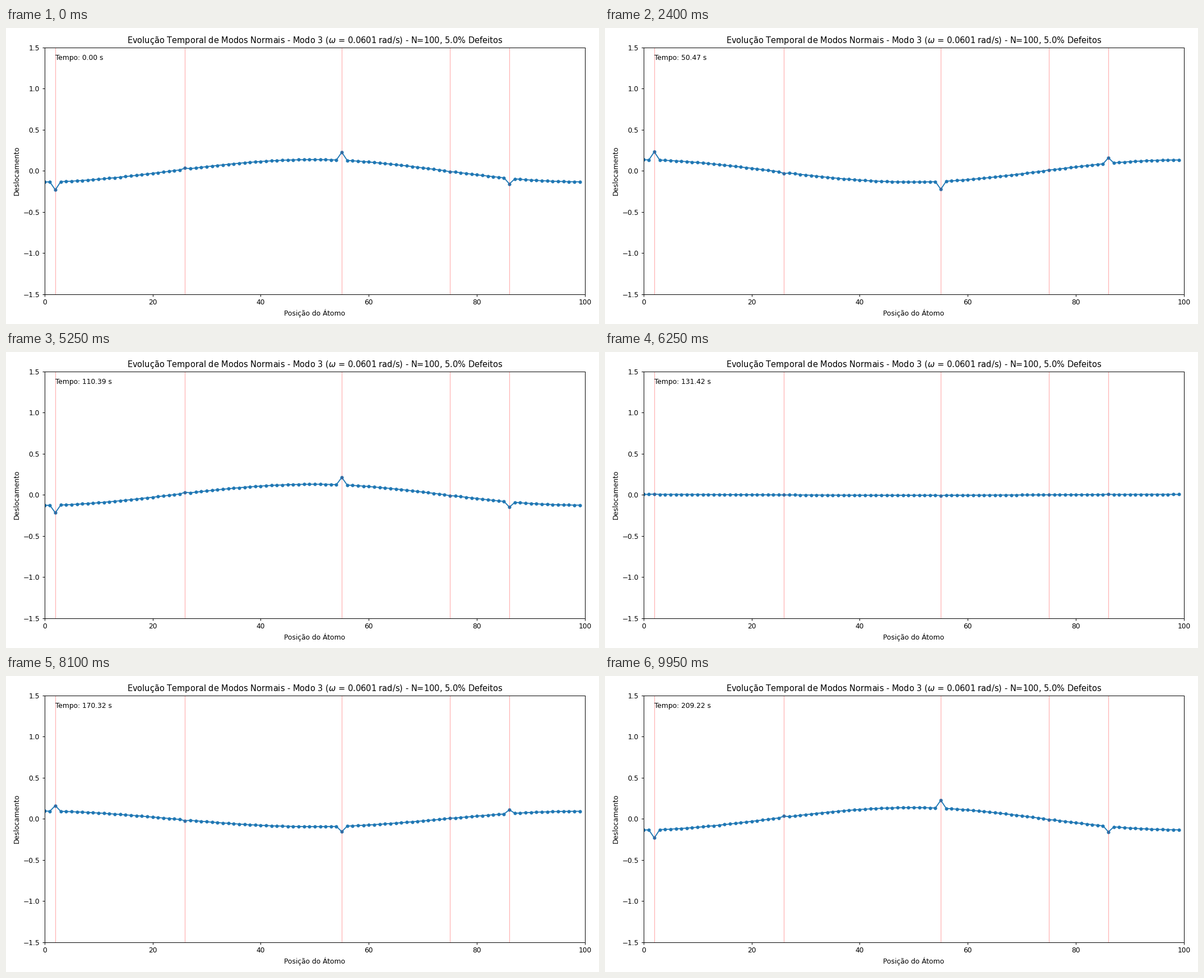
Animation of 1058x529 px, one loop 10 s. Source, as a matplotlib script:

```python
import numpy as np
import matplotlib.pyplot as plt
from matplotlib.animation import FuncAnimation

N = 100
DEFECTS = [2, 26, 55, 75, 86]
DEFECT_MASS = 3.0
MODE = 2
FRAMES = 200


def normal_mode(index):
    """Frequency and shape of one mode of a free chain with mass defects."""
    mass = np.ones(N)
    mass[DEFECTS] = DEFECT_MASS
    stiff = 2 * np.eye(N) - np.eye(N, k=1) - np.eye(N, k=-1)
    stiff[0, 0] = stiff[-1, -1] = 1
    values, vectors = np.linalg.eigh(stiff / np.sqrt(np.outer(mass, mass)))
    shape = vectors[:, index]
    return np.sqrt(values[index]), -shape * np.sign(shape[0])


omega, shape = normal_mode(MODE)
times = np.linspace(0, 4 * np.pi / omega, FRAMES)

plt.rcParams["font.family"] = "DejaVu Sans"
fig, ax = plt.subplots(figsize=(12, 6), dpi=100)
line, = ax.plot(np.arange(N), shape, "o-", markersize=4)
for pos in DEFECTS:
    ax.axvline(pos, color="red", alpha=0.3, linewidth=1)
clock = ax.text(0.02, 0.95, "", transform=ax.transAxes)

ax.set_xlim(0, N)
ax.set_ylim(-1.5, 1.5)
ax.set_xlabel("Posição do Átomo")
ax.set_ylabel("Deslocamento")
ax.set_title(
    f"Evolução Temporal de Modos Normais - Modo {MODE + 1} "
    rf"($\omega$ = {omega:.4f} rad/s) - N={N}, {100 * len(DEFECTS) / N:.1f}% Defeitos",
    fontsize=11.95,
)
# Lay out at 100 dpi, then scale the whole figure to 1058 x 529 pixels.
fig.tight_layout()
fig.set_dpi(1058 / 12)


def update(frame):
    t = times[frame]
    line.set_ydata(shape * np.cos(omega * t))
    clock.set_text(f"Tempo: {t:.2f} s")
    return line, clock


anim = FuncAnimation(fig, update, frames=FRAMES, interval=50, repeat=True, repeat_delay=0)
plt.show()
```
